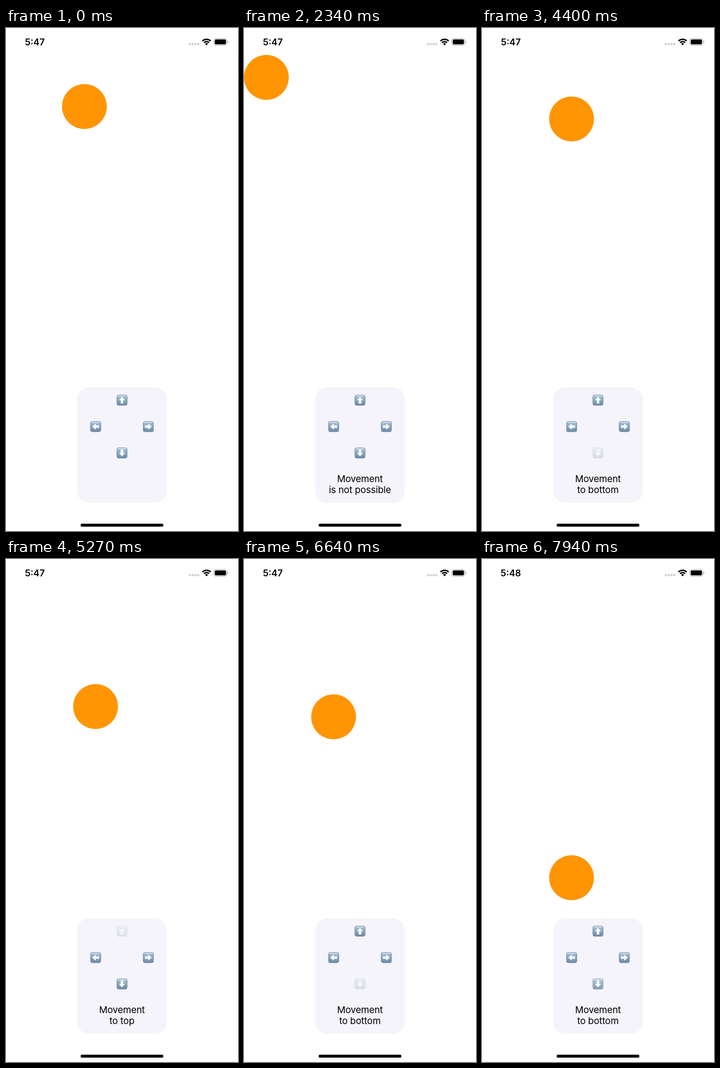
Animation of 509x1101 px, one loop 8000 ms. Source, as an HTML page:

```html
<!DOCTYPE html>
<html lang="en">
<head>
<meta charset="utf-8">
<title>Move the ball</title>
<style>
  html, body { margin: 0; width: 100%; height: 100%; overflow: hidden; background: #fff; }
  svg { display: block; width: 100%; height: 100%; }
  text { font-family: Inter, "Liberation Sans", sans-serif; text-anchor: middle; }
  #clock { font-size: 20px; font-weight: 600; }
  .message { font-size: 20.4px; letter-spacing: -.15px; }
</style>
</head>
<body>
<svg viewBox="0 0 509 1101">
  <defs>
    <linearGradient id="key" x2="0" y2="1">
      <stop offset="0" stop-color="#c3d6e4"/>
      <stop offset=".22" stop-color="#9ab7cf"/>
      <stop offset="1" stop-color="#6c89a5"/>
    </linearGradient>
    <g id="tile">
      <rect x="-11.3" y="-11.3" width="22.6" height="22.6" rx="4" fill="url(#key)" stroke="#67859f"/>
      <path d="M-8 -9.4H8" stroke="#e3eef5" stroke-width="1.4" stroke-linecap="round"/>
    </g>
    <path id="arrow" d="M0 -7.4L6.8 .2H2.8V7.4H-2.8V.2H-6.8Z" fill="#fff"/>
  </defs>

  <text id="clock" x="63.2" y="37.8">5:47</text>
  <g fill="#d3d3d3">
    <rect x="401.2" y="33" width="4.8" height="4.8" rx="1.2"/>
    <rect x="407.3" y="33" width="4.8" height="4.8" rx="1.2"/>
    <rect x="413.4" y="33" width="4.8" height="4.8" rx="1.2"/>
    <rect x="419.5" y="33" width="4.8" height="4.8" rx="1.2"/>
  </g>
  <path d="M431 28.35A13.2 13.2 0 0 1 449 28.35M434.4 32A8.2 8.2 0 0 1 445.6 32"
        fill="none" stroke="#000" stroke-width="3.1"/>
  <path d="M440 38L436.8 34.56A4.7 4.7 0 0 1 443.2 34.56Z"/>
  <rect x="456" y="23.1" width="28.6" height="14.6" rx="4.6" fill="none" stroke="#a6a6a6" stroke-width="1.2"/>
  <rect x="458" y="25.1" width="24.6" height="10.6" rx="2.8"/>
  <path d="M486.1 28.1Q488 28.7 488 30.4T486.1 32.7Z" fill="#a6a6a6"/>

  <circle id="ball" r="49.1" fill="#ff9502"/>
  <rect x="156" y="786.6" width="197" height="252.6" rx="26" fill="#f5f4fa"/>
  <g id="keys"></g>
  <text class="message" id="line1" x="254.4" y="993.6"></text>
  <text class="message" id="line2" x="254.4" y="1018.4"></text>
  <rect x="163.7" y="1085" width="181.6" height="6.4" rx="3.2"/>
</svg>

<script>
const LOOP = 8000, STEP = 73.7, RADIUS = 49.1, TOP = 59;
const MOVE_MS = 200, FADE_MS = 350, HOLD_MS = 70, DIMMED = 0.15;
const byId = id => document.getElementById(id);

const directions = {
  top:    { x: 254.5, y: 814.6, angle: 0,   dx: 0,  dy: -1 },
  left:   { x: 196.7, y: 872.5, angle: -90, dx: -1, dy: 0 },
  right:  { x: 312.3, y: 872.5, angle: 90,  dx: 1,  dy: 0 },
  bottom: { x: 254.5, y: 930.2, angle: 180, dx: 0,  dy: 1 }
};

for (const [name, d] of Object.entries(directions)) {
  byId("keys").insertAdjacentHTML("beforeend",
    `<g id="${name}" transform="translate(${d.x} ${d.y})">
       <use href="#tile"/><use href="#arrow" transform="rotate(${d.angle})"/></g>`);
}

// Direction, time of the first press, then the release time of every tap.
const bursts = [
  ["left", 500, 590, 850],
  ["top", 1800, 1900],
  ["top", 2540, 2770],
  ["right", 3150, 3235],
  ["right", 3640, 3700],
  ["bottom", 4070, 4146, 4334, 4522],
  ["top", 5170, 5230, 5390],
  ["bottom", 6139, 6200, 6388, 6576, 6764, 6952, 7140],
  ["bottom", 7640, 7700]
];

const start = { x: 122.9, y: 122.8 };
const taps = [];
const model = { ...start };
for (const [name, firstPress, ...releases] of bursts) {
  releases.forEach((release, i) => {
    const { dx, dy } = directions[name];
    const wanted = { x: model.x + dx * STEP, y: model.y + dy * STEP };
    const x = Math.max(0, wanted.x), y = Math.max(TOP, wanted.y);
    const blocked = x - wanted.x > 0.5 || y - wanted.y > 0.5;
    taps.push({
      name, release,
      press: i ? release - HOLD_MS : firstPress,
      dx: x - model.x, dy: y - model.y,
      message: blocked ? "is not possible" : "to " + name
    });
    Object.assign(model, { x, y });
  });
}

// Standard ease-in-out: cubic-bezier(.42, 0, .58, 1).
function ease(p) {
  if (p <= 0) return 0;
  if (p >= 1) return 1;
  let lo = 0, hi = 1;
  for (let i = 0; i < 20; i++) {
    const u = (lo + hi) / 2, v = 1 - u;
    if (3 * v * v * u * 0.42 + 3 * v * u * u * 0.58 + u * u * u < p) lo = u; else hi = u;
  }
  return lo * lo * (3 - 2 * lo);
}

function draw(t) {
  let { x, y } = start, message = "";
  const opacity = { top: 1, left: 1, right: 1, bottom: 1 };
  for (const tap of taps) {
    if (t < tap.press) break;
    const since = t - tap.release;
    opacity[tap.name] = DIMMED + (1 - DIMMED) * ease(since / FADE_MS);
    if (since < 0) continue;
    const moved = ease(since / MOVE_MS);
    x += tap.dx * moved;
    y += tap.dy * moved;
    message = tap.message;
  }
  byId("ball").setAttribute("cx", x + RADIUS);
  byId("ball").setAttribute("cy", y + RADIUS);
  for (const name in opacity) byId(name).setAttribute("opacity", opacity[name]);
  byId("line1").textContent = message && "Movement";
  byId("line2").textContent = message;
  byId("clock").textContent = t < 6970 ? "5:47" : "5:48";
}

const began = performance.now();
function tick() {
  draw((performance.now() - began) % LOOP);
  requestAnimationFrame(tick);
}
tick();
</script>
</body>
</html>
```
